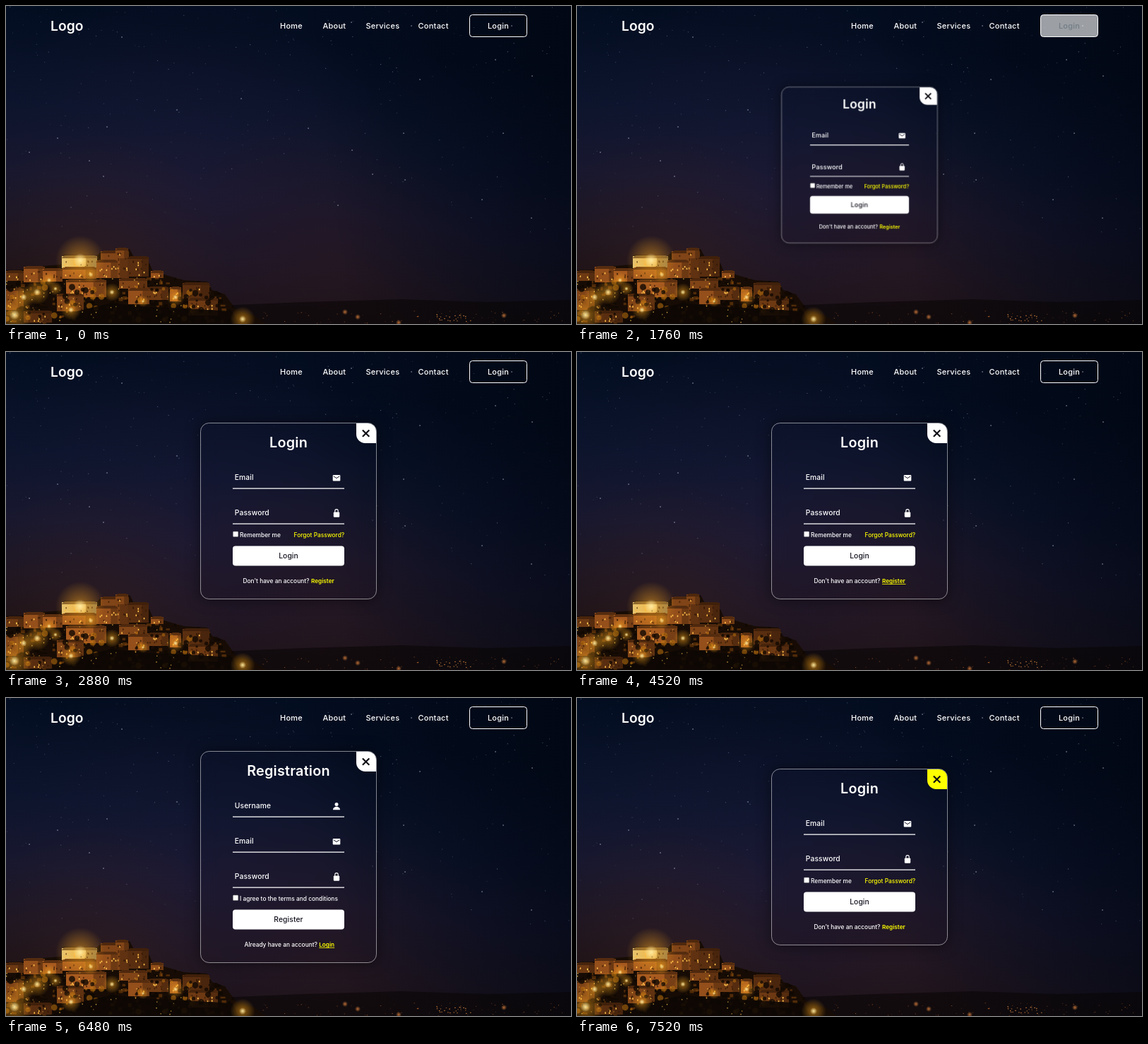
These frames come from a looping animation (800x450 px, 8000 ms). An HTML page with a canvas:

```html
<!DOCTYPE html>
<html lang="en">
<head>
<meta charset="utf-8">
<title>Login popup</title>
<style>
html, body { margin: 0; width: 100%; height: 100%; overflow: hidden; background: #060b1b; }
body { position: relative; display: grid; place-items: center; font-family: Poppins, Inter, sans-serif; }
canvas, .layer { position: absolute; left: 0; top: 0; width: 800px; height: 450px; }
svg { display: block; fill: #fff; }
svg text { font-family: Poppins, Inter, sans-serif; font-weight: 500; font-size: 10.3px; letter-spacing: .1px; }
.nav text { font-size: 11px; letter-spacing: .25px; }
.nav .logo { font-size: 19.3px; font-weight: 600; letter-spacing: 0; }
.title { font-size: 19.8px !important; font-weight: 600 !important; letter-spacing: .2px !important; text-anchor: middle; }
.small text { font-size: 8.4px; letter-spacing: 0; }
.small .link { font-weight: 600; font-size: 8.2px; }
.link, .yellow { fill: #ff0; }
.mid { text-anchor: middle; }
.end { text-anchor: end; }
.dark { fill: #141420; }
.rule { stroke: #fff; stroke-width: 1.25; }
.check { stroke: #767676; stroke-width: .6; }

.open {
  position: absolute; left: 656px; top: 12px; width: 82px; height: 32px; box-sizing: border-box;
  border: 1.25px solid #fff; border-radius: 4.5px; color: #fff;
  font-size: 11px; font-weight: 500; line-height: 30px; text-align: center; letter-spacing: .2px;
}
.popup {
  position: relative; width: 250px; height: 250px; box-sizing: border-box; overflow: hidden;
  border: 1px solid rgba(255,255,255,.5); border-radius: 12.5px;
  backdrop-filter: blur(12px); box-shadow: 0 0 19px rgba(0,0,0,.5);
}
.form { position: absolute; left: -1px; top: 50%; width: 250px; height: 300px; margin-top: -150px; }
.close {
  position: absolute; right: 0; top: 0; width: 28px; height: 28px;
  background: #fff; border-bottom-left-radius: 12.5px;
}
.close svg { width: 28px; height: 28px; stroke: #0c0c12; stroke-width: 2.1; }
.cursor { stroke: #222; stroke-width: .6; stroke-linejoin: round; }

/* One shared 8 s clock: 1% = 80 ms */
.open, .popup, .form, .close, .cursor, .cursor path, .lit { animation: 8s linear infinite; }
.open { animation-name: hover; animation-timing-function: ease; }
.popup { animation-name: pop, grow; animation-duration: 8s, 8s; animation-timing-function: ease, ease; animation-iteration-count: infinite, infinite; }
.login { animation-name: login; }
.register { animation-name: register; }
.cursor { animation-name: move; }
.lit, .cursor path { opacity: 0; animation-timing-function: step-end; }
.close { animation-name: close; animation-timing-function: step-end; }
.arrow { animation-name: arrow; }
.hand { animation-name: hand; }
.login-btn { animation-name: login-btn; }
.register-btn { animation-name: register-btn; }
.register-link { animation-name: register-link; }
.login-link { animation-name: login-link; }

@keyframes hover {
  0%, 8.75% { background: rgba(255,255,255,0); color: #fff; }
  15%, 20.5% { background: rgba(255,255,255,1); color: #162938; }
  26.75%, 100% { background: rgba(255,255,255,0); color: #fff; }
}
@keyframes pop {
  0%, 18.25% { transform: scale(0); }
  24.5%, 100% { transform: scale(1); }
}
@keyframes grow {
  0%, 58.875% { height: 250px; }
  61.375%, 83.125% { height: 300px; }
  85.625%, 100% { height: 250px; }
}
@keyframes login {
  0% { transform: none; animation-timing-function: step-end; }
  58.875% { transform: translateX(-250px); animation-timing-function: step-end; }
  83.125% { transform: translateX(-250px); animation-timing-function: ease; }
  85.375%, 100% { transform: translateX(0); }
}
@keyframes register {
  0% { transform: translateX(250px); animation-timing-function: step-end; }
  58.875% { transform: translateX(250px); animation-timing-function: ease; }
  61.125% { transform: translateX(0); animation-timing-function: step-end; }
  83.125%, 100% { transform: translateX(250px); }
}
@keyframes close { 0% { background: #fff; } 93.5%, 100% { background: #ff0; } }
@keyframes login-btn { 0%, 39.4%, 100% { opacity: 0; } 38% { opacity: 1; } }
@keyframes register-btn { 0%, 71%, 100% { opacity: 0; } 64% { opacity: 1; } }
@keyframes register-link { 0%, 58.875%, 100% { opacity: 0; } 55% { opacity: 1; } }
@keyframes login-link { 0%, 83.125%, 100% { opacity: 0; } 80% { opacity: 1; } }
@keyframes hand {
  0%, 20.5%, 39.4%, 71%, 84% { opacity: 0; }
  9%, 38%, 55%, 80%, 93.5%, 100% { opacity: 1; }
}
@keyframes arrow {
  0%, 38%, 55%, 80%, 93.5%, 100% { opacity: 0; }
  20.5%, 39.4%, 71%, 84% { opacity: 1; }
}
@keyframes move {
  0%, 17% { transform: translate(700px, 35px); }
  19.5% { transform: translate(694px, 36px); }
  20.5% { transform: translate(668px, 44px); }
  22% { transform: translate(625px, 65px); }
  27% { transform: translate(541px, 178px); }
  31.5%, 37.5% { transform: translate(490px, 268px); }
  38.5% { transform: translate(474px, 284px); }
  39.5% { transform: translate(468px, 317px); }
  40%, 46.5% { transform: translate(464px, 303px); }
  48.5%, 51% { transform: translate(517px, 328px); }
  56%, 64% { transform: translate(461px, 324px); }
  67.5%, 70% { transform: translate(462px, 312px); }
  71% { transform: translate(462px, 328px); }
  74% { transform: translate(470px, 338px); }
  77% { transform: translate(525px, 345px); }
  80.5%, 84% { transform: translate(459px, 352px); }
  88% { transform: translate(457px, 353px); }
  90% { transform: translate(484px, 318px); }
  92.5% { transform: translate(506px, 180px); }
  93.75%, 100% { transform: translate(515px, 117px); }
}
</style>
</head>
<body>
<canvas width="800" height="450"></canvas>

<svg class="layer nav" viewBox="0 0 800 450">
  <text class="logo" x="63" y="35">Logo</text>
  <text x="388" y="32">Home</text>
  <text x="448.5" y="32">About</text>
  <text x="509.5" y="32">Services</text>
  <text x="583.5" y="32">Contact</text>
</svg>
<div class="open">Login</div>

<div class="popup">
  <svg class="form login" viewBox="275 75 250 300">
    <defs>
      <g id="mail">
        <rect x="-5.3" y="-4.2" width="10.6" height="8.4" rx="1"/>
        <path d="M-4.2-2.4 0 .4 4.2-2.4" fill="none" stroke="#141428" stroke-width="1"/>
      </g>
      <g id="lock">
        <rect x="-4.2" y="-1.6" width="8.4" height="7.4" rx="1.2"/>
        <path d="M-2.2-1V-3.2a2.2 2.2 0 0 1 4.4 0V-1" fill="none" stroke="#fff" stroke-width="1.1"/>
      </g>
    </defs>
    <text class="title" x="400" y="135.3">Login</text>
    <text x="323.8" y="181.4">Email</text>
    <use href="#mail" x="468" y="178.2"/>
    <path class="rule" d="M321 193h158M321 243h158"/>
    <text x="323.8" y="231.4">Password</text>
    <use href="#lock" x="468" y="228"/>
    <rect class="check" x="321.4" y="254" width="7.4" height="7.4" rx="1"/>
    <g class="small">
      <text x="331" y="261.8">Remember me</text>
      <text class="yellow end" x="479.3" y="261.8">Forgot Password?</text>
      <text class="end" x="429.5" y="327">Don't have an account?</text>
      <text class="link" x="432" y="327">Register</text>
    </g>
    <rect class="yellow lit register-link" x="432" y="328" width="33.5" height=".8"/>
    <rect x="321" y="274.5" width="158" height="28" rx="4"/>
    <rect class="yellow lit login-btn" x="321" y="274.5" width="158" height="28" rx="4"/>
    <text class="dark mid" x="400" y="292.2">Login</text>
  </svg>

  <svg class="form register" viewBox="275 75 250 300">
    <text class="title" x="400" y="110.3">Registration</text>
    <text x="323.8" y="156.4">Username</text>
    <circle cx="468" cy="150.4" r="2.5"/>
    <path d="M463 158.2c0-6 10-6 10 0z"/>
    <path class="rule" d="M321 168h158M321 218h158M321 268h158"/>
    <text x="323.8" y="206.4">Email</text>
    <use href="#mail" x="468" y="203.2"/>
    <text x="323.8" y="256.4">Password</text>
    <use href="#lock" x="468" y="253"/>
    <rect class="check" x="321.4" y="279" width="7.4" height="7.4" rx="1"/>
    <g class="small">
      <text x="331" y="286.8">I agree to the terms and conditions</text>
      <text class="end" x="441" y="352">Already have an account?</text>
      <text class="link" x="443.2" y="352">Login</text>
    </g>
    <rect class="yellow lit login-link" x="443.2" y="353" width="22" height=".8"/>
    <rect x="321" y="299.5" width="158" height="28" rx="4"/>
    <rect class="yellow lit register-btn" x="321" y="299.5" width="158" height="28" rx="4"/>
    <text class="dark mid" x="400" y="317.2">Register</text>
  </svg>

  <div class="close"><svg viewBox="0 0 28 28"><path d="M8.9 9.4l9.4 9.4M18.3 9.4l-9.4 9.4"/></svg></div>
</div>

<svg class="layer" viewBox="0 0 800 450">
  <g class="cursor">
    <path class="arrow" d="M0 0V10l2.4-2.2 1.5 3.4 1.6-.7-1.5-3.3H7z"/>
    <path class="hand" d="M-1.2.8v6L-2.6 5.6q-1.4-.6-1.6.6l3 4.8q.5 1.8 1 2h5q1.4-3 1.4-5V4.6q-.6-1-1.4-.3-.6-1-1.6-.4-.8-.9-1.9-.4V.8Q0-.5-1.2.8z"/>
  </g>
</svg>

<script>
const c = document.querySelector('canvas').getContext('2d');
let seed = 11;
const rnd = (a = 0, b = 1) => {
  seed = (seed * 16807) % 2147483647;
  return a + (b - a) * seed / 2147483647;
};
const rect = (color, x, y, w, h) => { c.fillStyle = color; c.fillRect(x, y, w, h); };
const fade = (g, stops) => { stops.forEach(([at, color]) => g.addColorStop(at, color)); return g; };
const glow = (x, y, r, rgb, a) => rect(
  fade(c.createRadialGradient(x, y, 0, x, y, r), [[0, `rgba(${rgb},${a})`], [1, `rgba(${rgb},0)`]]),
  x - r, y - r, 2 * r, 2 * r);
const shape = (color, pts) => {
  c.fillStyle = color;
  c.beginPath();
  for (let i = 0; i < pts.length; i += 2) c.lineTo(pts[i], pts[i + 1]);
  c.fill();
};

function sky() {
  rect(fade(c.createLinearGradient(60, 0, 0, 450), [
    [0, '#030d20'], [.3, '#0b142c'], [.52, '#17172e'], [.72, '#1c1521'], [.92, '#1b1010'], [1, '#0d0706']
  ]), 0, 0, 800, 450);
  glow(260, 260, 300, '36,28,58', .4);
  glow(460, 350, 220, '46,24,30', .4);
  rect(fade(c.createLinearGradient(420, 60, 800, 0), [[0, 'rgba(1,5,16,0)'], [1, 'rgba(1,5,16,.72)']]), 0, 0, 800, 450);
  glow(130, 370, 190, '90,42,12', .22);
}

function stars() {
  for (let i = 0; i < 300; i++) {
    const s = rnd(.5, 1.1);
    rect(`rgba(190,205,235,${rnd(.1, .5)})`, rnd(0, 800), 320 * rnd() ** 1.3, s, s);
  }
  const bright = [143,171, 73,187, 118,219, 33,207, 138,241, 586,104, 565,246, 489,23, 574,28, 716,28,
    428,173, 490,204, 470,282, 563,180, 693,76, 745,99, 704,180, 674,274, 744,300, 333,131, 164,44, 242,147, 519,238];
  for (let i = 0; i < bright.length; i += 2) {
    rect('rgba(205,215,235,.75)', bright[i] - .6, bright[i + 1] - .6, 1.3, 1.3);
  }
}

function plain() {
  shape('rgba(9,5,5,.6)', [300, 424, 420, 419, 560, 415, 680, 419, 800, 416, 800, 450, 300, 450]);
  for (let i = 0; i < 70; i++) {
    rect(`rgba(230,130,60,${rnd(.15, .6)})`, rnd(350, 800), rnd(431, 449), rnd(.7, 1.8), 1);
  }
  for (let i = 0; i < 24; i++) rect(`rgba(255,160,80,${rnd(.4, .9)})`, rnd(608, 658), rnd(436, 446), 1.5, 1.1);
  [[498, 440], [556, 448], [705, 438], [480, 433]].forEach(([x, y]) => glow(x, y, 4, '255,150,70', .7));
}

// x, y, width, height, brightness 0-9
const houses = [
  [0,375,25,14,3], [25,369,30,22,5], [52,372,28,18,6], [79,354,50,17,9], [80,370,48,16,6],
  [134,347,40,38,4], [155,343,18,14,4], [172,355,30,28,2], [128,360,30,25,5], [205,375,18,10,5],
  [85,388,57,24,6], [160,386,40,14,4], [0,400,25,30,4], [250,392,38,22,2], [200,398,30,18,3],
  [173,400,30,22,5], [232,398,16,20,6], [72,408,38,24,4], [258,414,42,24,3], [25,432,40,16,2]
];
function house([x, y, w, h, b]) {
  const lit = (k) => `rgb(${50 + 23 * b * k},${24 + (b > 8 ? 23 : 13) * b * k},${8 + (b > 8 ? 15 : 4.5) * b * k})`;
  rect(lit(.85), x, y, w, h);
  rect(lit(.5), x + w * .68, y, w * .32, h);
  shape(lit(.3), [x - 1, y + 3, x + 4, y - 1, x + w - 3, y - 1, x + w + 1, y + 3]);
  for (let i = 0; i < w * h / 75; i++) {
    rect(rnd() < .35 ? '#ffc04a' : 'rgba(45,20,5,.7)', x + rnd(2, w - 3), y + rnd(5, h - 3), 1.6, 2.4);
  }
}

function village() {
  c.save();
  shape('#170c05', [0, 374, 25, 373, 50, 368, 78, 366, 82, 352, 128, 354, 134, 348, 175, 344, 182, 357,
    203, 364, 208, 376, 224, 380, 252, 388, 285, 390, 292, 402, 310, 408, 326, 430, 352, 438, 368, 450, 0, 450]);
  c.clip();
  for (let i = 0; i < 260; i++) {
    const x = rnd(0, 320);
    rect(rnd() < .5 ? 'rgba(150,80,15,.45)' : 'rgba(12,6,2,.7)', x, rnd(368, 445), rnd(2, 7), rnd(2, 5));
  }
  c.restore();
  houses.forEach(house);
  for (let i = 0; i < 110; i++) {
    c.fillStyle = rnd() < .35 ? 'rgba(190,115,15,.55)' : 'rgba(18,9,3,.8)';
    const x = rnd(0, 300);
    c.beginPath();
    c.arc(x, rnd(386 + x * .06, 446), rnd(1.5, 4.5), 0, 7);
    c.fill();
  }
  shape('rgba(13,7,4,.88)', [60, 450, 100, 432, 150, 420, 190, 425, 255, 428, 320, 432, 330, 450]);
  [[92,430,9], [61,388,7], [240,412,8], [120,380,8], [70,400,6], [12,437,16], [44,405,11], [194,418,5],
    [335,443,11], [105,360,22], [150,405,8], [25,412,10]].forEach(([x, y, r]) => {
    glow(x, y, r * 1.6, '255,170,30', .55);
    glow(x, y, r * .45, '255,240,170', .9);
  });
  for (let i = 0; i < 70; i++) rect(`rgba(255,200,80,${rnd(.4, .95)})`, 250 * rnd() ** 1.4, rnd(384, 447), 1.3, 1.5);
}

sky();
stars();
plain();
village();
</script>
</body>
</html>
```
